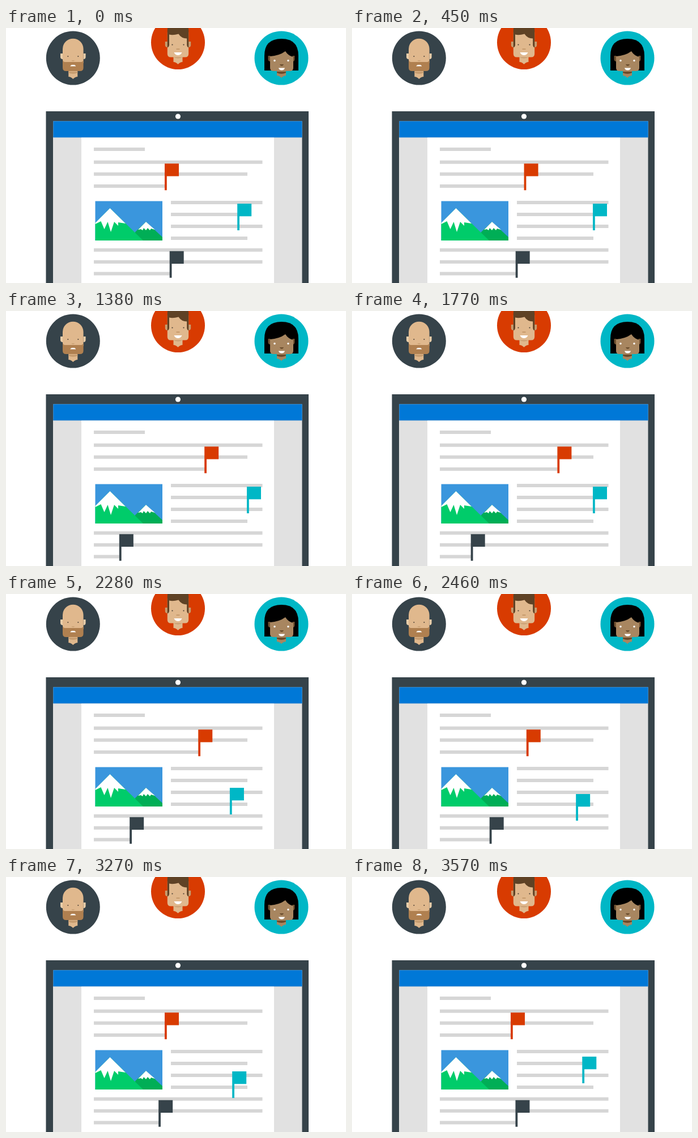
These frames come from a looping animation (600 px wide and 450 px high, 3.6 s). An HTML page:

```html
<!DOCTYPE html>
<html lang="en">
<head>
<meta charset="utf-8">
<title>Writing together</title>
<style>
  html, body { margin: 0; width: 100%; height: 100%; overflow: hidden; background: #fff; }
  svg { display: block; width: 600px; height: 450px; }
</style>
</head>
<body>
<svg viewBox="0 0 600 450">
  <g id="people"></g>

  <g id="laptop">
    <path d="M70.500 147H534v303H70.500z" fill="#36434a"/>
    <circle cx="303.500" cy="156" r="4.600" fill="#fff"/>
    <path d="M83 193H522.500V450H83z" fill="#e1e1e1"/>
    <path d="M83.500 164.500h439v28.500h-439z" fill="#0078d7" stroke="#4a94d0" stroke-width=".8"/>
    <path d="M133 193.500h340V450H133z" fill="#fff"/>
  </g>

  <g id="photo">
    <path d="M157.500 305.500H276V375H157.500z" fill="#3a96dd"/>
    <path d="M228 360l19-18l29 27v6h-48z" fill="#00ae56"/>
    <path d="M247 342l-14 14l5-1l3 2l2-4l4 4l3-4l4 4l2-3l7 2z" fill="#fff"/>
    <path d="M157.500 344l26-26l58.500 57h-84.500z" fill="#00cc6a"/>
    <path d="M183.500 318l-26 26v2l10-5l6 14l6-13l5.500 18l6-18l7 7v-6l13 2z" fill="#fff"/>
  </g>

  <g id="lines" stroke="#d6d6d6" stroke-width="6"></g>
  <g id="flags"></g>
</svg>
<script>
const LOOP = 3600;
const ORANGE = '#d83b01', SLATE = '#36434a', TEAL = '#00b7c6';
const LEFT = 155, WIDE = 452.5, SHORT = 426, PITCH = 21;

const add = (parent, name, attrs) => {
  const el = document.createElementNS('http://www.w3.org/2000/svg', name);
  for (const key in attrs) el.setAttribute(key, attrs[key]);
  return document.getElementById(parent).appendChild(el);
};
const shape = (d, fill) => `<path d="${d}" fill="${fill}"/>`;
const pair = (x, y, r, fill) =>
  [-x, x].map(cx => `<circle cx="${cx}" cy="${y}" r="${r}" fill="${fill}"/>`).join('');

// Everything in a portrait is relative to the centre of its badge
function portrait({ x, y, badge, skin, shade, ear, earY, half, neck, back = '', front }) {
  const ears = [-1, 1].map(s => shape(`M${s * half} ${earY}h${s * 4}v6q0 4 ${-s * 4} 4z`, ear));
  add('people', 'g', { transform: `translate(${x} ${y})` }).innerHTML =
    `<circle r="47.500" fill="${badge}"/>` + back + ears.join('') +
    shape(`M-8 20H8V${neck - 4}Q4 ${neck - 4} 0 ${neck}Q-4 ${neck - 4}-8 ${neck - 4}z`, skin) +
    shape('M-8 24H8v2q-8 4-16 0z', shade) + front;
}

portrait({
  x: 118.3, y: 53, badge: SLATE, skin: '#e0b88d', shade: '#c79d70',
  ear: '#e8cda9', earY: -8, half: 18.3, neck: 37,
  front: shape('M-18.300 9V-16a18.300 18.300 0 0 1 36.600 0V9z', '#e0b88d') +
    shape('M-18.300 3q1 4 4 4h28.600q3 0 4-4V17q0 6-6 6h-24.600q-6 0-6-6z', '#b08050') +
    pair(9, -3, 1, '#4c4136') + shape('M-3 4h6q-3 3-6 0z', '#c79d70') +
    shape('M-5 14.500q1-2.500 3-2.500h4q2 0 3 2.500z', '#fff')
});

portrait({
  x: 303.5, y: 25.5, badge: ORANGE, skin: '#e0b88d', shade: '#c79d70',
  ear: '#c79d70', earY: -1.5, half: 18.7, neck: 38.5,
  front: shape('M-18.700-18h37.400V20q0 6-6 6h-25.400q-6 0-6-6z', '#e0b88d') +
    shape('M-18.700 9V-22q0-9 9-9H9.700q9 0 9 9V9q-3-1-3-5V-7Q6-7 1-15Q-9-12-15.500-14V4q0 4-3.200 5z', '#5f4225') +
    pair(10, 4, 1.1, '#4c4136') + shape('M-3 11h6v1.500h-6z', '#bd9062') +
    shape('M-7 17.500H7q-2 5-7 5t-7-5z', '#fff')
});

portrait({
  x: 486, y: 53, badge: TEAL, skin: '#a88660', shade: '#6a4b2b',
  ear: '#6e5030', earY: -4, half: 19.5, neck: 35,
  back: shape('M-30 22V-4q0-30 30-30t30 30v26z', '#000'),
  front: shape('M-20-3Q-4-4 7-12Q12-4 21-2V17q0 6-6 6h-29q-6 0-6-6z', '#a88660') +
    pair(12, 4.5, 1.7, '#fff') + shape('M-3 11h7q-1 3-3.500 3t-3.500-3z', '#6e5030') +
    shape('M-5 17.500H6q-1 4-5.500 4t-5.500-4z', '#fff')
});

const rule = (left, right, y) => add('lines', 'path', { d: `M${left} ${y}H${right}` });
const paragraph = (left, top, ends) => ends.forEach((end, i) => rule(left, end, top + i * PITCH));
rule(LEFT, 245, 214);
paragraph(LEFT, 236.8, [WIDE, SHORT]);
paragraph(291, 308, [WIDE, SHORT, WIDE, SHORT]);
paragraph(LEFT, 391.8, [WIDE, WIDE]);

const flag = fill => add('flags', 'path', { d: 'M0 0H25V22.300H3.800V47H0z', fill });
const place = (el, x, y) => el.setAttribute('transform', `translate(${x} ${y})`);
const mix = (a, b, k) => a + (b - a) * k;
const bend = (a, b, c, k) => mix(mix(a, b, k), mix(b, c, k), k);
const ease = (t, start, end) => {
  const k = Math.min(1, Math.max(0, (t - start) / (end - start)));
  return k * k * (3 - 2 * k);
};

const orangeX = t => 280 + 23.6 * ease(t, 0, 450) + 46.4 * ease(t, 540, 980) +
  12.4 * ease(t, 1350, 1770) - 82.4 * ease(t, 2040, 2730);

const slateX = t => 288.7 - 89 * ease(t, 540, 1230) + 10 * ease(t, 1350, 1770) +
  48 * ease(t, 2147, 2647) + 31 * ease(t, 3040, 3600);

function tealAt(t) {
  if (t < 1940) return [408.2 + 16.8 * ease(t, 0, 450), 310];
  const out = ease(t, 1940, 2540);
  // The loop restarts before the way back has settled
  const back = ease(t, 3040, 3750);
  return [
    bend(425, 384, 396.2, out) + 12 * back,
    bend(310, 343.6, 354, out) - 44 * back
  ];
}

// A writer's flag pulls the end of its line along
function writer(color, top, lineY, xAt) {
  const pole = flag(color), line = rule(LEFT, LEFT, lineY);
  return t => {
    const x = xAt(t);
    place(pole, x, top);
    line.setAttribute('d', `M${LEFT} ${lineY}H${x + 1}`);
  };
}
const writers = [writer(ORANGE, 239.3, 279, orangeX), writer(SLATE, 393.8, 433.6, slateX)];
const tealFlag = flag(TEAL);

const begin = performance.now();
function tick() {
  const t = (performance.now() - begin) % LOOP;
  writers.forEach(draw => draw(t));
  place(tealFlag, ...tealAt(t));
  requestAnimationFrame(tick);
}
tick();
</script>
</body>
</html>
```
